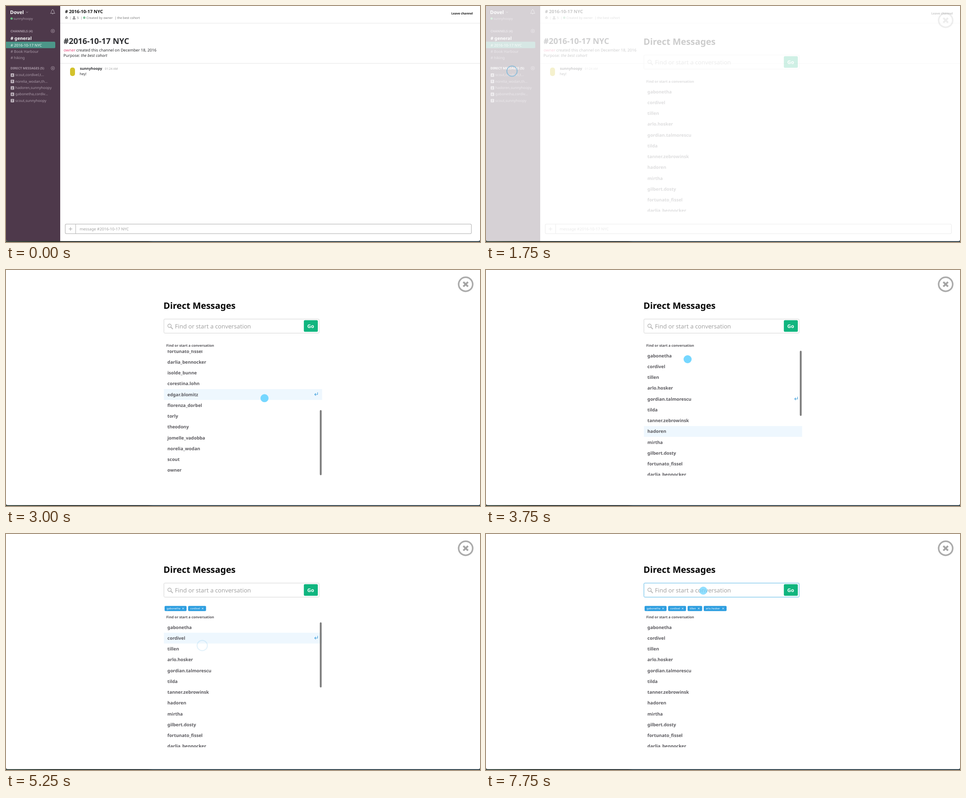
An HTML page that plays this animation: 1058 px wide and 529 px high, repeating every 8 s.

```html
<!DOCTYPE html>
<html lang="en">
<head>
<meta charset="utf-8">
<title>Direct Messages</title>
<style>
  html, body { margin: 0; height: 100%; overflow: hidden; background: #fff; }
  svg { display: block; width: 100vw; height: 100vh; font-family: "Noto Sans", "Open Sans", sans-serif; }
  text { white-space: pre; text-rendering: geometricPrecision; }
  .b { font-weight: 700; }
  .line { fill: none; stroke-linecap: round; stroke-linejoin: round; }
</style>
</head>
<body>
<svg viewBox="0 0 1058 529">
  <defs>
    <linearGradient id="desk">
      <stop offset="0" stop-color="#3a4a42"/>
      <stop offset=".1" stop-color="#232b26"/>
      <stop offset=".3" stop-color="#263034"/>
      <stop offset=".31" stop-color="#2f424c"/>
      <stop offset="1" stop-color="#2f424c"/>
    </linearGradient>
    <clipPath id="window"><path d="M0 0H1058V523q0 4-4 4H4q-4 0-4-4z"/></clipPath>
    <clipPath id="view"><rect x="350" y="180" width="360" height="281"/></clipPath>
  </defs>
  <rect y="520" width="1058" height="9" fill="url(#desk)"/>
  <g clip-path="url(#window)">
    <rect width="1058" height="529" fill="#fff"/>
    <g id="page">
      <path fill="#4e394b" d="M0 0h121v529H0z"/>
      <path fill="#4c9689" d="M0 80h107.500q2.500 0 2.500 2.500v9.500q0 2.500-2.500 2.500H0z"/>
      <path class="line" stroke="#a094a0" d="M45 13l2 2 2-2"/>
      <path class="line" stroke="#b5abb4" d="M99.500 16.200q2-1.500 2-4.700 0-2.900 2.700-2.900t2.700 2.900q0 3.200 2 4.700zM103 17.500q1.200 1.300 2.400 0M104.200 8.400v-1"/>
      <circle cx="12.500" cy="28" r="2.600" fill="#69bd83"/>
      <path fill="none" stroke="#e6e6e6" d="M121 38.500h937M121 128.500h937"/>
      <path class="line" stroke="#444" stroke-width=".8" d="M135 23.300l.8 1.900 2 .1-1.500 1.300.5 2-1.800-1.100-1.800 1.100.5-2-1.500-1.300 2-.1z"/>
      <path class="line" stroke="#444" d="M149.200 28.900q0-2 2.700-2t2.700 2z"/>
      <circle cx="151.900" cy="24.600" r="1.300" fill="none" stroke="#444"/>
      <circle cx="174.700" cy="26.200" r="2.600" fill="#82c59b"/>
      <rect x="143" y="138" width="11" height="19" rx="5" fill="#d3c22c"/>
      <rect x="132.300" y="488.800" width="906.400" height="21.600" rx="2.500" fill="none" stroke="#bcbcbc" stroke-width="1.300"/>
      <path fill="none" stroke="#bcbcbc" stroke-width="1.200" d="M155.500 489v21"/>
      <path fill="none" stroke="#a5a5a5" stroke-width="1.100" d="M140 499.800h8M144 495.800v8"/>
    </g>
    <rect id="shade" width="1058" height="529" fill="#fff"/>
    <g id="panel">
      <circle cx="1026" cy="32" r="15.700" fill="none" stroke="#ababab" stroke-width="3.500"/>
      <path stroke="#a3a3a3" stroke-width="4" d="M1020.800 26.800l10.400 10.400M1031.200 26.800l-10.400 10.400"/>
      <rect id="field" x="352.500" y="110" width="346.500" height="31.500" rx="2" fill="#fff"/>
      <circle cx="365" cy="125" r="3.800" fill="none" stroke="#b2b2b2" stroke-width="1.400"/>
      <path class="line" stroke="#b2b2b2" stroke-width="1.900" d="M368.200 128.200l3.600 3.600"/>
      <rect x="664.800" y="112.500" width="31.200" height="26" rx="2.500" fill="#10b57f"/>
      <g id="chips"></g>
      <g id="results">
        <g clip-path="url(#view)">
          <g id="list">
            <rect id="hover" x="352.500" width="353" height="24.250" fill="#eef7fe"/>
            <path id="enter" class="line" stroke="#3f9fdc" stroke-width="1.100" d="M695.500 7.500v4.500h-6.500M691.300 9.700L689 12l2.300 2.300"/>
          </g>
        </g>
        <rect id="bar" x="700.500" width="4" height="146" rx="2" fill="#7b7b7b"/>
      </g>
    </g>
    <circle id="cursor" r="9" fill="#6fd5ff" fill-opacity=".95"/>
    <circle id="ripple" r="11.500" fill="none" stroke="#3ba4dc" stroke-width="2"/>
  </g>
</svg>
<script>
const $ = id => document.getElementById(id);
const ROW = 24.25, TOP = 180, VIEW = 281, MAX = 252.5, STEP = 250, LOOP = 8000;
const names = `gabonetha cordivel tillen arlo.hosker gordian.talmorescu tilda tanner.zebrowinsk hadoren
  mirtha gilbert.dosty fortunato_fissel darlia_bennocker isolde_bunne corestina.lohn edgar.blomitz
  florenza_dorbel torly theodony jomelle_vadobba norelia_wodan scout owner`.split(/\s+/);

function add(parent, tag, attrs, content = '') {
  const el = document.createElementNS('http://www.w3.org/2000/svg', tag);
  for (const k in attrs) el.setAttribute(k, attrs[k]);
  el.innerHTML = content;
  return $(parent).appendChild(el);
}
const text = (parent, x, y, size, fill, str, bold) =>
  add(parent, 'text', { x, y, 'font-size': size, fill, class: bold ? 'b' : '' }, str);

// Sidebar
const dim = '#ab9ba9';
text('page', 9, 17.5, 11, '#fff', 'Dovel', 1);
text('page', 16.7, 30.5, 7.5, dim, 'sunnyhoopy');
text('page', 10, 58.7, 7.2, dim, 'CHANNELS (4)', 1);
text('page', 10, 75.7, 10, '#fff', '# general', 1);
text('page', 10.3, 90.5, 8.4, '#e9f3f1', '# 2016-10-17 NYC');
text('page', 10.3, 105, 8.3, dim, '# Book Harbour');
text('page', 10.3, 119.3, 8.3, dim, '# hiking');
const heading = text('page', 10, 142, 7.2, dim, 'DIRECT MESSAGES (5)', 1);
for (const y of [56, 139.4]) {
  add('page', 'circle', { cx: 104.4, cy: y, r: 3.9, fill: 'none', stroke: dim, 'stroke-width': .9 });
  add('page', 'path', { d: `M102.400 ${y}h4M104.400 ${y - 2}v4`, stroke: dim, 'stroke-width': .9 });
}
[[4, 'scout,cordivel,t...'], [5, 'norelia_wodan,th...'], [2, 'hadoren,sunnyhoopy'],
 [6, 'gabonetha,cordiv...'], [2, 'scout,sunnyhoopy']].forEach(([n, who], i) => {
  const y = 154.8 + i * 14.35;
  add('page', 'rect', { x: 10.5, y: y - 3.8, width: 7.7, height: 7.7, rx: 1, fill: '#c3b9c2' });
  text('page', 12.6, y + 2.2, 6, '#4e394b', n, 1);
  text('page', 20.7, y + 2.6, 8.1, dim, who);
});

// Channel
text('page', 131.7, 15.7, 10.05, '#111', '# 2016-10-17 NYC', 1);
const grey = '#777';
text('page', 142, 28.8, 7.1, grey, '|');
text('page', 158.5, 28.8, 7.1, grey, '5');
text('page', 166.2, 28.8, 7.1, grey, '|');
text('page', 179.5, 28.8, 7.1, grey, 'Created by owner');
text('page', 242.5, 28.8, 7.1, grey, '|');
text('page', 248, 28.8, 7.1, grey, 'the best cohort');
text('page', 994, 18.7, 6.7, '#111', 'Leave channel', 1);
text('page', 128.6, 85, 17.9, '#2c2d30', '#2016-10-17 NYC', 1);
text('page', 128.7, 102, 8.8, '#2c2d30',
  '<tspan fill="#e6467a">owner</tspan> created this channel on December 18, 2016');
text('page', 128.3, 114.2, 8.8, '#2c2d30', 'Purpose: <tspan font-style="italic">the best cohort</tspan>');
text('page', 164.9, 143.4, 8.15, '#2c2d30', 'sunnyhoopy', 1);
text('page', 220.6, 143, 6.67, '#a5a5a5', '01:24 AM');
text('page', 164.4, 155.2, 7.9, '#2c2d30', 'hey!');
text('page', 164.2, 503, 8.77, '#a0a0a0', 'message #2016-10-17 NYC');

// Dialog
text('panel', 351.6, 87, 19.8, '#000', 'Direct Messages', 1);
text('panel', 377, 131, 13.2, '#a3a3a3', 'Find or start a conversation');
text('panel', 672.6, 129.7, 11.2, '#fff', 'Go', 1);
text('results', 357.8, 172, 7.72, '#555459', 'Find or start a conversation', 1);
names.forEach((n, i) => text('list', 360.3, 15.7 + i * ROW, 10, '#5a595e', n, 1));
const chips = [[354, 49], [406.5, 40], [450, 32.5], [486, 51]].map(([x, w], i) => {
  const id = 'chip' + i, end = x + w - 9.7;
  const chip = add('chips', 'g', { id });
  add(id, 'rect', { x, y: 161.2, width: w, height: 11.5, rx: 2, fill: '#2d9ee0' });
  text(id, x + 4.5, 169.2, 6, '#fff', names[i]);
  add(id, 'path', { d: `M${end} 165l4 4m0-4l-4 4`, stroke: '#fff', 'stroke-width': .8 });
  return chip;
});

// Motion
const ramp = (points, t, k = 1) => {
  const i = points.findIndex(p => p[0] > t);
  if (i === 0) return points[0][k];
  if (i < 0) return points[points.length - 1][k];
  const a = points[i - 1], b = points[i];
  return a[k] + (b[k] - a[k]) * (t - a[0]) / (b[0] - a[0]);
};
const path = [
  [1000, 150, 230], [1500, 58, 146], [1750, 58, 146], [2000, 540, 236], [2250, 600.6, 238],
  [2750, 583, 285], [3000, 577, 287.3], [3250, 570, 287], [3750, 450, 200], [4250, 433, 202],
  [4500, 433, 220], [5000, 433, 234], [5250, 438, 250], [5500, 441, 257], [5750, 447, 275],
  [6000, 452, 276], [6250, 457, 243], [6500, 464, 205], [7000, 480, 158], [7500, 487, 138], [7750, 485, 127]];
const scrolls = [[2250, 0], [2750, MAX], [3250, MAX], [3750, 0]];
const shades = [[1500, 0], [1750, .77], [2250, .98], [2500, 1]];
const fades = [[1500, 0], [1750, .2], [2250, .94], [2500, 1]];
const glow = [[2000, 0], [2500, 1]];
const picks = [4200, 4950, 5450, 5950], clicks = [1650, ...picks];

const shift = t => t >= picks[0] ? 17 : 0;
function rowAt(t) {
  const x = ramp(path, t), y = ramp(path, t, 2) - TOP - shift(t);
  return x > 352 && x < 706 && y >= 0 && y < VIEW ? Math.floor((y + ramp(scrolls, t)) / ROW) : -1;
}
const set = (id, key, value) => $(id).setAttribute(key, value);
function place(id, row, opacity) {
  set(id, 'transform', `translate(0 ${row * ROW})`);
  set(id, 'opacity', row < 0 ? 0 : opacity);
}

function draw(t) {
  const scroll = ramp(scrolls, t), x = ramp(path, t), y = ramp(path, t, 2);
  set('shade', 'opacity', ramp(shades, t));
  set('panel', 'opacity', ramp(fades, t));
  heading.setAttribute('fill', t >= 1500 ? '#fff' : dim);
  set('field', 'stroke', t >= 7250 ? '#55b5e6' : '#d4d4d4');
  set('results', 'transform', `translate(0 ${shift(t)})`);
  set('list', 'transform', `translate(0 ${TOP - scroll})`);
  // the highlight and the enter mark trail the pointer
  place('hover', rowAt(t - 250), ramp(glow, t));
  place('enter', rowAt(t - 125), 1);
  set('bar', 'y', TOP + 1 + scroll * 133 / MAX);
  set('bar', 'opacity', t < 2500 ? 0 : ramp([[6250, 1], [6750, 0]], t));
  chips.forEach((c, i) => c.setAttribute('opacity', t >= picks[i] ? 1 : 0));

  const click = clicks.find(c => t >= c && t < c + 400);
  for (const id of ['cursor', 'ripple']) { set(id, 'cx', x); set(id, 'cy', y); }
  set('cursor', 'opacity', t < 1000 || click ? 0 : t >= 7000 ? .8 : 1);
  set('ripple', 'opacity', click ? .6 * (1 - (t - click) / 400) : 0);
}

const start = performance.now();
function tick(now) {
  const t = Math.max(0, now - start) % LOOP;
  draw(Math.floor(t / STEP) * STEP);
  requestAnimationFrame(tick);
}
draw(0);
requestAnimationFrame(tick);
</script>
</body>
</html>
```
